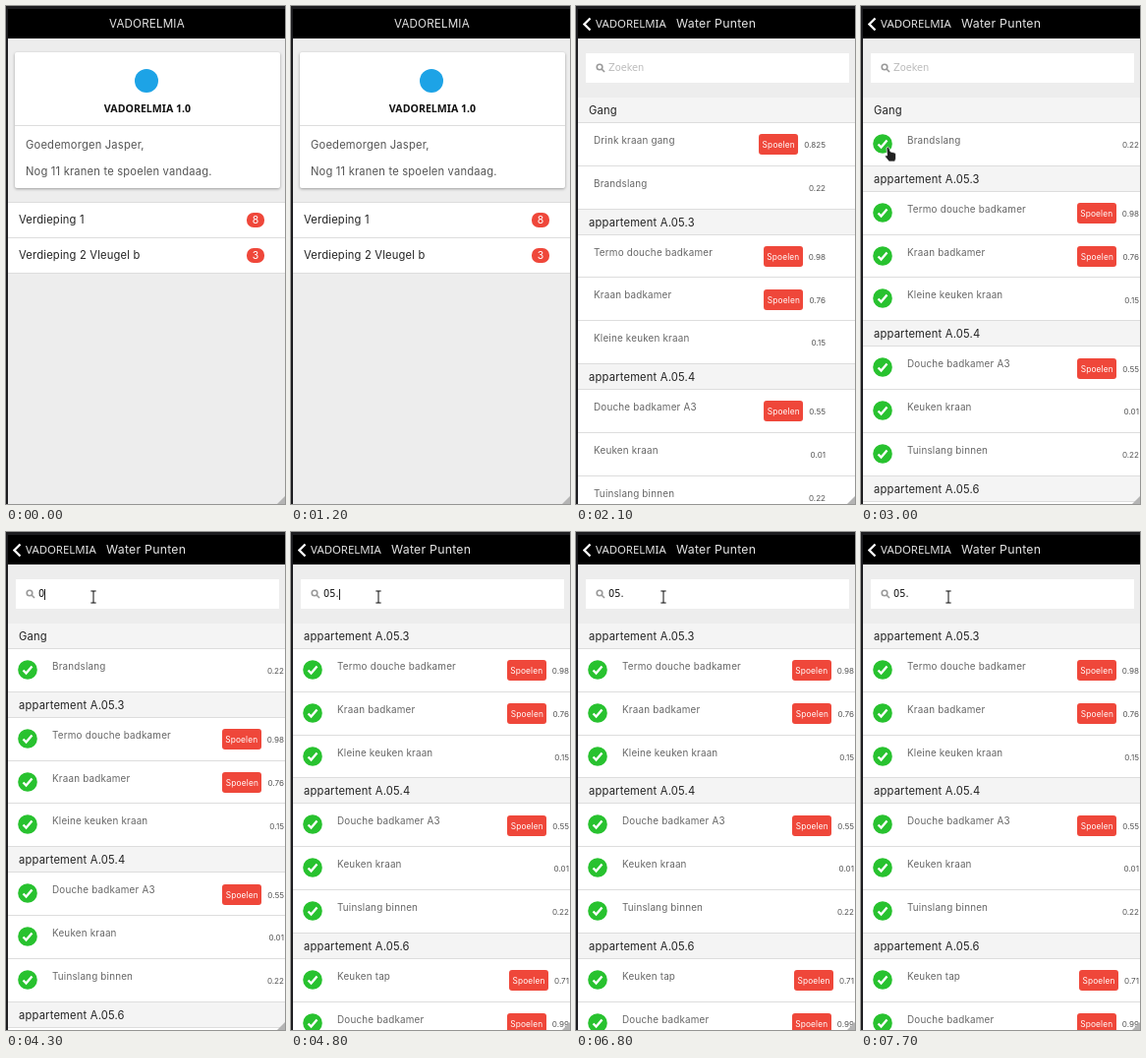
An HTML page that plays this animation: 284x506 px, repeating every 8 s.

```html
<!DOCTYPE html>
<html lang="nl">
<head>
<meta charset="utf-8">
<style>
html, body { margin: 0; width: 100%; height: 100%; overflow: hidden; }
body { background: #1d1d20; font: 11.2px Inter, sans-serif; letter-spacing: .18px; color: #222; }
#stage { position: absolute; left: 0; top: 0; width: 284px; height: 506px; overflow: hidden; }
#stage * { position: absolute; box-sizing: border-box; white-space: nowrap; }
#header { left: 2px; top: 3px; width: 282px; height: 30px; background: #000; color: #e4e4e4; line-height: 30px; overflow: hidden; }
#brand { font-size: 11.6px; }
#brand.back { font: 11.4px/30px "Noto Sans", sans-serif; letter-spacing: 0; }
#title { font-size: 12.3px; letter-spacing: .25px; }
#view { left: 2px; top: 33px; width: 282px; height: 473px; overflow: hidden; background: #ededed; }
.page { left: 0; top: 0; width: 282px; height: 473px; background: #ededed; }

.card { left: 7px; top: 14px; width: 270px; height: 138px; background: #fff; border-radius: 2px; box-shadow: 0 1px 3px rgba(0,0,0,.35); color: #555; line-height: 20px; }
.logo { left: 122px; top: 17px; width: 24px; height: 24px; border-radius: 50%; background: #1da3e6; }
.name { left: 0; top: 47px; width: 270px; text-align: center; font: 600 10.6px/20px "Noto Sans", sans-serif; letter-spacing: 0; color: #111; }
.rule { left: 0; top: 74px; width: 270px; height: 1px; background: #ddd; }
.floor { left: 0; width: 282px; height: 37px; padding-left: 11px; line-height: 35px; background: #fff; border: solid #ddd; border-width: 1px 0; }
.badge { left: 243px; top: 10px; width: 18px; height: 15px; border-radius: 7px; background: #ef473a; color: #fff; font-size: 10.5px; line-height: 15px; text-align: center; }

#points { box-shadow: 0 0 8px rgba(0,0,0,.3); }
#blank { left: 0; top: 325px; width: 282px; height: 148px; background: #fff; }
.search { left: 8px; top: 15px; width: 268px; height: 30px; background: #fff; }
.search svg { left: 10px; top: 10px; }
#query { left: 23px; top: 5px; font: 9.8px/20px "DejaVu Sans", sans-serif; letter-spacing: 0; }
#caret { top: 10px; width: 1px; height: 11px; background: #222; }
#list { left: 0; top: 60px; width: 282px; }
#stage .group, #stage .head, #stage .row { position: relative; }
.head { height: 26.1px; padding-left: 11px; line-height: 26px; background: #f4f4f4; border-bottom: 1px solid #ddd; }
.row { height: 43.75px; background: #fff; border-bottom: 1px solid #ddd; overflow: hidden; }
.body { left: 0; top: 0; width: 282px; height: 43px; }
.label { left: 16px; top: 7px; font-size: 9.9px; line-height: 20px; color: #666; }
.side { right: 30px; top: 11.3px; display: flex; gap: 6px; line-height: 22px; }
#stage .side * { position: static; }
.side b { width: 40px; height: 21px; border-radius: 3px; background: #ef473a; color: #fff; font-weight: 400; font-size: 8.3px; text-align: center; }
.side i { font-style: normal; font-size: 8.1px; letter-spacing: 0; color: #555; }
.check { left: 10px; top: 11px; }
</style>
</head>
<body>
<div id="stage">
  <div id="view">
    <div class="page" id="home">
      <div class="card">
        <div class="logo"></div>
        <div class="name">VADORELMIA 1.0</div>
        <div class="rule"></div>
        <span style="left:11px;top:84px">Goedemorgen Jasper,</span>
        <span style="left:11px;top:111px">Nog 11 kranen te spoelen vandaag.</span>
      </div>
      <div class="floor" id="floor" style="top:166px">Verdieping 1<span class="badge">8</span></div>
      <div class="floor" style="top:202px">Verdieping 2 Vleugel b<span class="badge">3</span></div>
    </div>
    <div class="page" id="points">
      <div id="blank"></div>
      <div class="search">
        <svg width="10" height="10" fill="none" stroke="#999" stroke-width="1.6"><circle cx="4" cy="4" r="2.8"/><path d="M6 6l3 3"/></svg>
        <span id="query"></span><span id="caret"></span>
      </div>
      <div id="list"></div>
    </div>
  </div>
  <div id="header">
    <svg id="chevron" style="left:5px;top:8px" width="9" height="15" fill="none" stroke="#fff" stroke-width="2.3"><path d="M7.500 1.500l-6 6 6 6"/></svg>
    <span id="brand">VADORELMIA</span>
    <span id="title">Water Punten</span>
  </div>
  <svg style="left:276px;top:498px" width="8" height="8"><path d="M0 8L8 0V8z" fill="#b4b4b4"/></svg>
  <svg id="cursor" style="left:0;top:0;overflow:visible" width="16" height="18" stroke="#fff" stroke-width=".7">
    <path id="hand" fill="#222" d="M0 0q1.500-1.500 2.500 0l1.500 4 4 1q1.500 0 1.500 2v4l-1 3h-6l-4-5q0-2 2-1z"/>
    <path id="arrow" fill="#222" d="M0 0v12l3-3 2 4 2-1-2-4h4z"/>
    <path id="beam" fill="#444" d="M-3-7h6v2h-2v10h2v2h-6v-2h2v-10h-2z"/>
  </svg>
</div>
<script>
const $ = id => document.getElementById(id);
const LOOP = 8000;

// A trailing * marks a tap that still has to be flushed.
const groups = {
  "Gang": ["Drink kraan gang|0.825*", "Brandslang|0.22"],
  "appartement A.05.3": ["Termo douche badkamer|0.98*", "Kraan badkamer|0.76*", "Kleine keuken kraan|0.15"],
  "appartement A.05.4": ["Douche badkamer A3|0.55*", "Keuken kraan|0.01", "Tuinslang binnen|0.22"],
  "appartement A.05.6": ["Keuken tap|0.71*", "Douche badkamer|0.99*"]
};
const check = `<svg class="check" width="20" height="20"><circle cx="10" cy="10" r="9.8" fill="#28c22f"/>
  <path d="M5.500 10.500l3 3 6-7" fill="none" stroke="#fff" stroke-width="2.400"/></svg>`;

function rowHtml(item) {
  const [label, value] = item.split("|");
  const button = value.endsWith("*") ? "<b>Spoelen</b>" : "";
  return `<div class="row">${check}<div class="body"><span class="label">${label}</span>
    <span class="side">${button}<i>${value.replace("*", "")}</i></span></div></div>`;
}
$("list").innerHTML = Object.entries(groups).map(([name, items]) =>
  `<div class="group"><div class="head">${name}</div>${items.map(rowHtml).join("")}</div>`).join("");

const hall = document.querySelector(".group");
const drink = document.querySelector(".row");
const bodies = document.querySelectorAll(".body");
const checks = document.querySelectorAll(".check");

const typing = [[0, "Zoeken"], [4300, "0"], [4500, "05"], [4600, "05."],
  [5000, "05.0"], [5100, "05.06"], [6100, "05.0"], [6500, "05."]];

const ramp = (t, from, to) => Math.min(1, Math.max(0, (t - from) / (to - from)));
const mix = (a, b, p) => a + (b - a) * p;
const smooth = p => p * p * (3 - 2 * p);
const show = (el, on) => el.style.display = on ? "" : "none";
const move = (el, x, y = 0) => el.style.transform = `translate(${x}px,${y}px)`;

// cubic-bezier(.36, .66, .04, 1)
function glide(x) {
  const curve = (s, a, b) => 3 * (1 - s) ** 2 * s * a + 3 * (1 - s) * s * s * b + s ** 3;
  let lo = 0, hi = 1;
  for (let i = 0; i < 24; i++) {
    const mid = (lo + hi) / 2;
    if (curve(mid, .36, .04) < x) lo = mid; else hi = mid;
  }
  return curve(hi, .66, 1);
}

function render(t) {
  const sliding = t > 1617;
  const p = sliding ? glide(ramp(t, 1617, 2117)) : 0;
  move($("home"), -93 * p);
  move($("points"), 282 * (1 - p));
  show($("points"), sliding);
  $("home").style.filter = `brightness(${1 - .07 * p})`;
  $("floor").style.background = t >= 1500 ? "#d0d0d0" : "#fff";

  $("brand").className = sliding ? "back" : "";
  move($("brand"), mix(103, 18, p));
  move($("title"), mix(290, 100, p));
  $("chevron").style.opacity = p;

  const open = smooth(ramp(t, 2100, 2300));
  bodies.forEach(el => move(el, 29 * open));
  checks.forEach(el => move(el, -32 * (1 - open)));
  show(drink, t < 2400);
  show(hall, t < 4500);
  show($("list"), t < 5000 || t >= 6500);

  const text = typing.findLast(([at]) => t >= at)[1];
  $("query").textContent = text;
  $("query").style.color = t < 4300 ? "#bbb" : "#111";
  show($("caret"), t >= 4300 && t < 5100);
  $("caret").style.left = 23 + $("query").offsetWidth + "px";

  const m = smooth(ramp(t, 3250, 3700));
  const y = mix(144, 66, m);
  move($("cursor"), mix(26, 89, m), y);
  show($("cursor"), t >= 2300);
  show($("hand"), y > 130);
  show($("arrow"), y <= 130 && y > 78);
  show($("beam"), y <= 78);
}

const start = performance.now();
function tick() {
  render((performance.now() - start) % LOOP);
  requestAnimationFrame(tick);
}
tick();
</script>
</body>
</html>
```
